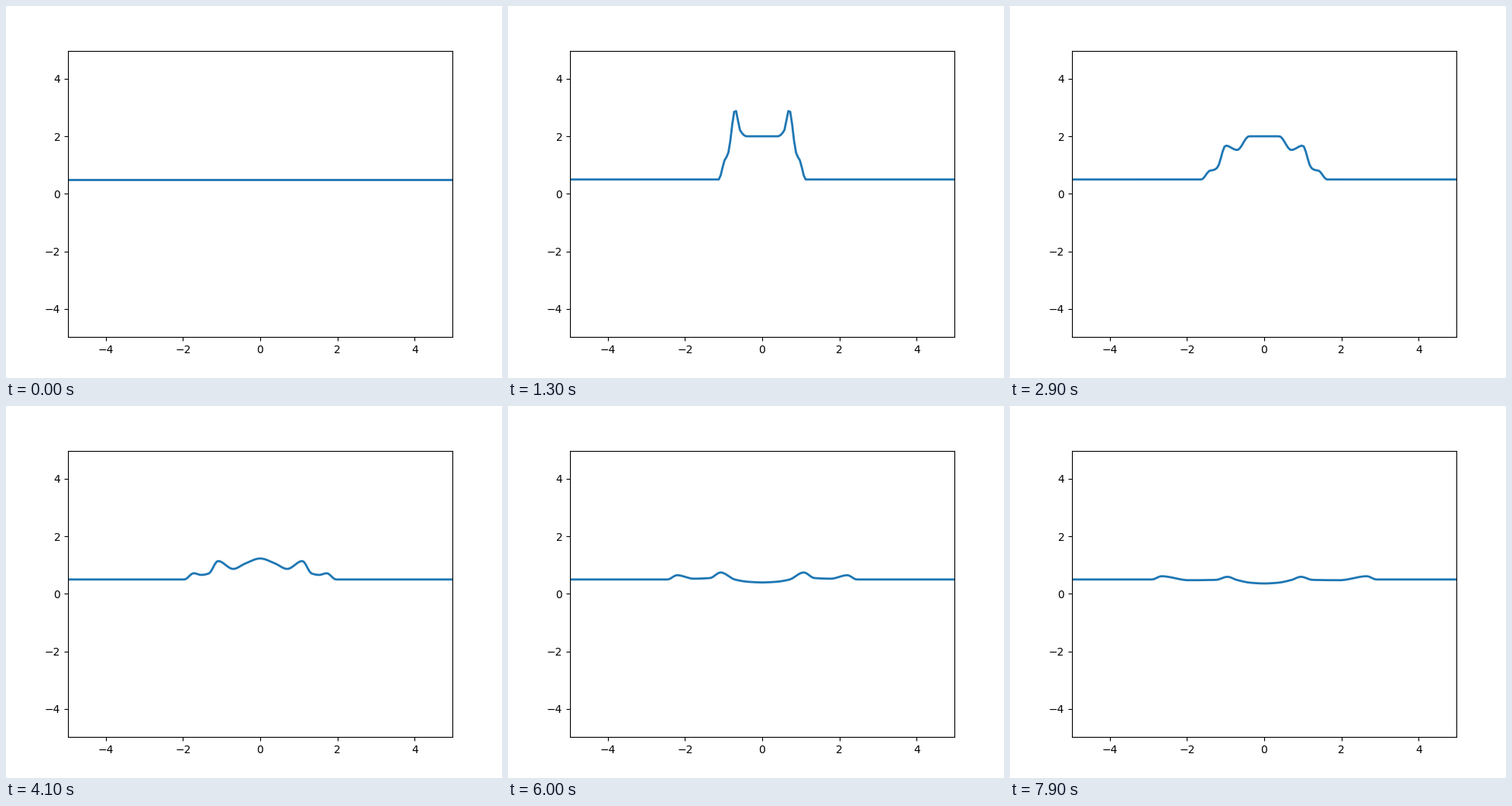
A matplotlib script for the animation above (8 s loop, 640 by 480 pixels).

```python
import numpy as np
import matplotlib.pyplot as plt
from matplotlib.animation import FuncAnimation

FRAMES, STEP = 80, 100
REST, CORE = 0.5, 2.0
RELEASE = 3.6  # the core is held at full height until this second
EDGE = 4.975


def ease(u):
    u = np.clip(u, 0, 1)
    return u * u * (3 - 2 * u)


def grow(t, tau):
    return 1 - np.exp(-t / tau)


def smooth(xk, yk, x):
    """Monotone cubic interpolation through the points (xk, yk)."""
    h = np.diff(xk)
    d = np.diff(yk) / h
    m = np.zeros(len(xk))
    w1, w2 = 2 * h[1:] + h[:-1], h[1:] + 2 * h[:-1]
    same = d[:-1] * d[1:] > 0
    a, b = np.where(same, d[:-1], 1), np.where(same, d[1:], 1)
    m[1:-1] = np.where(same, (w1 + w2) / (w1 / a + w2 / b), 0)

    i = np.clip(np.searchsorted(xk, x, side="right") - 1, 0, len(h) - 1)
    s = (x - xk[i]) / h[i]
    return (yk[i] * (1 + 2 * s) * (1 - s) ** 2
            + h[i] * m[i] * s * (1 - s) ** 2
            + yk[i + 1] * s ** 2 * (3 - 2 * s)
            + h[i] * m[i + 1] * s ** 2 * (s - 1))


def features(t):
    """(radius, height) of each feature, from the centre outwards."""
    # leading wave: slows down while its crest fades as 1/t
    foot = 0.55 + 0.47 * t ** 0.78
    crest = foot - 0.25 * grow(t, 1.3)
    crest_y = REST + min(1.0, 0.89 / t)

    # dense shell: swells until 5.2 s, then drifts back
    u = t / 5.2
    contact = 0.5 + 0.86 * (u * np.exp(1 - u)) ** 1.3
    shell = contact - (0.17 + 0.017 * t) * grow(t, 0.5)
    shell_y = REST + 5.2 * np.exp(-0.51 * t) * grow(t + 0.12, 0.6)

    trough = (contact + crest) / 2
    trough_y = REST - 0.06 + 1.58 * np.exp(-t / 2.07)
    contact_y = min(trough_y + 0.25 * np.exp(-t / 2.5), shell_y)

    dip = 0.47 + 0.23 * ease(t / 2.9)
    dip_y = min(0.48 + 1.8 * np.exp(-(t / 3.55) ** 3), shell_y)

    # core: collapses below the rest level once released
    held = np.exp(-(max(t - RELEASE, 0) / 0.745) ** 1.14)
    core_y = 0.36 + (CORE - 0.36) * held
    mix = (1 - held) * (0.2 + 1.5 * held)
    rim_y = core_y + (dip_y - core_y) * mix

    return np.array([
        (0, core_y), (0.42 - 0.01 * t, rim_y), (dip, dip_y),
        (shell, shell_y), (contact, contact_y), (trough, trough_y),
        (crest, crest_y), (foot, REST), (EDGE, REST),
    ]).T


def profile(t):
    if t == 0:
        return np.full_like(grid, REST)
    r, y = features(t)
    return smooth(np.r_[-r[:0:-1], r], np.r_[y[:0:-1], y], grid)


grid = np.linspace(-EDGE, EDGE, 200)
fig = plt.figure(figsize=(6.4, 4.8), dpi=100)
ax = fig.add_subplot(xlim=(-EDGE, EDGE), ylim=(-EDGE, EDGE))
line, = ax.plot(grid, profile(0), lw=2)


def update(i):
    line.set_ydata(profile(i * STEP / 1000))
    return line,


anim = FuncAnimation(fig, update, frames=FRAMES, interval=STEP,
                     repeat=True, repeat_delay=0)
plt.show()
```
